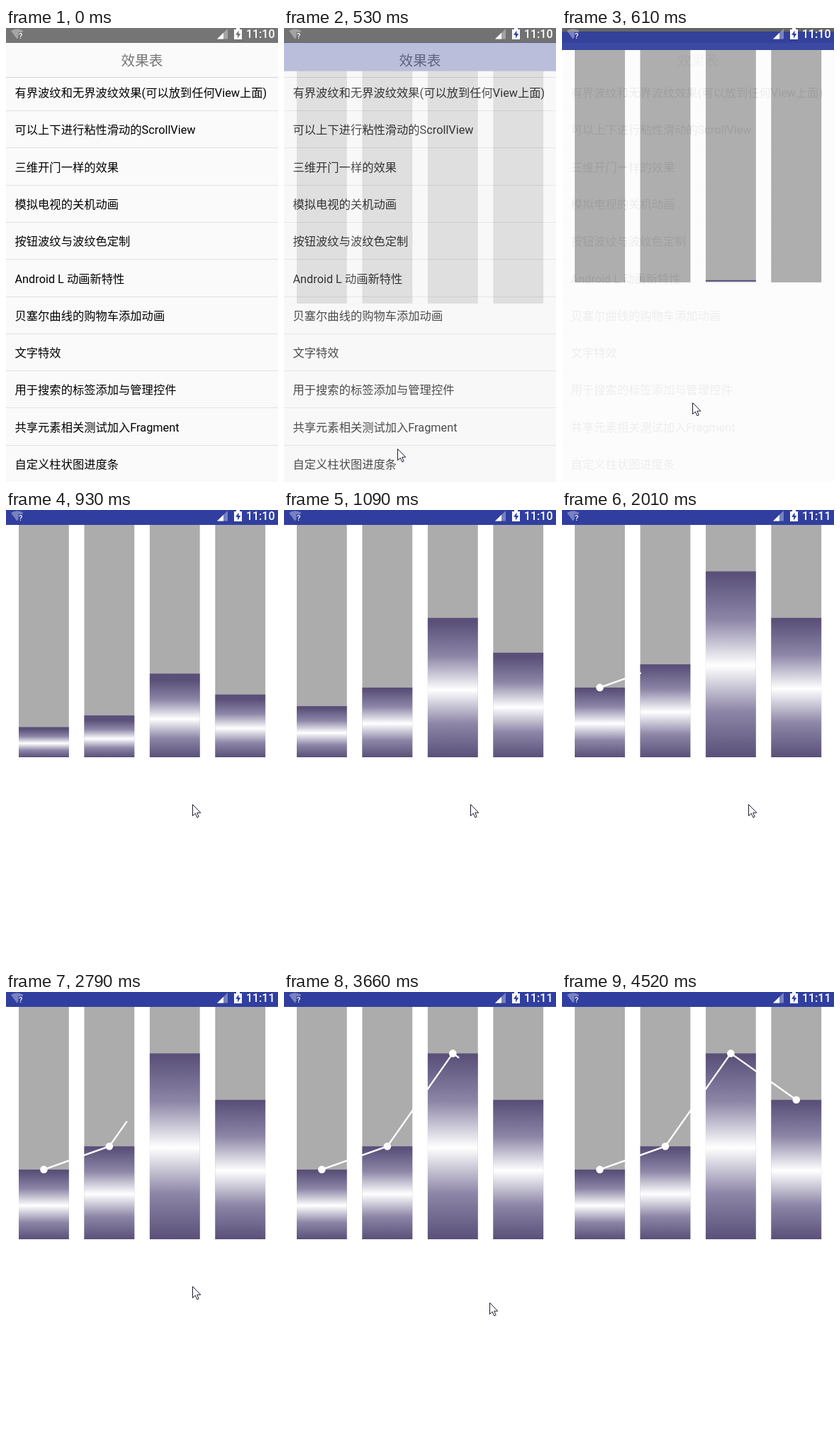
Write an HTML page with a canvas that moves like this. It is 384 px wide and 639 px high and loops after 5.38 s.

```html
<!DOCTYPE html>
<html lang="zh">
<head>
<meta charset="utf-8">
<style>
  html, body { margin: 0; width: 100%; height: 100%; overflow: hidden; background: #fff; }
  canvas { display: block; }
</style>
</head>
<body>
<canvas id="stage" width="384" height="639"></canvas>
<script>
const W = 384, H = 639, LOOP = 5380;
const ctx = document.getElementById('stage').getContext('2d');
const FONT = 'Roboto, "Noto Sans CJK SC", "Noto Sans CJK", sans-serif';

const ROWS = [
  '有界波纹和无界波纹效果(可以放到任何View上面)',
  '可以上下进行粘性滑动的ScrollView',
  '三维开门一样的效果',
  '模拟电视的关机动画',
  '按钮波纹与波纹色定制',
  'Android L 动画新特性',
  '贝塞尔曲线的购物车添加动画',
  '文字特效',
  '用于搜索的标签添加与管理控件',
  '共享元素相关测试加入Fragment',
  '自定义柱状图进度条'
];

const STATUS_H = 21, BASE = 348, FULL = BASE - STATUS_H;
const BAR_W = 70.8, PITCH = 92.45, PERCENTS = [30, 40, 80, 60];
const PAGE_START = 513, GROW_START = 548, GROW_TIME = 809;
const LINE_START = 1415, LINE_TIME = 1020, CLOCK_CHANGE = 1710;

// The screen refreshes in steps: [time, refresh count]
const REFRESH = [[140, 0], [530, 5], [1010, 11], [1090, 12], [1400, 16], [1860, 22], [2010, 24],
  [2490, 30], [3020, 37], [3570, 44], [3660, 45], [4140, 51], [4520, 56]];
const ticks = [0];
REFRESH.forEach(([time, n], i) => {
  ticks.push(time);
  const next = REFRESH[i + 1];
  if (!next) return;
  const steps = next[1] - n;
  for (let k = 1; k < steps; k++) {
    ticks.push(Math.round((time + (next[0] - time) * k / steps) / 10) * 10);
  }
});

// Pointer path: [time, x, y]
const POINTER = [[140, 142, 628], [220, 151, 619], [450, 151, 619], [530, 160, 592], [610, 184, 527],
  [690, 231, 464], [770, 248, 431], [850, 263, 414], [2860, 263, 414], [3020, 273, 423],
  [3570, 286, 432], [3660, 290, 437], [3740, 300, 452], [3980, 376, 596], [4060, 400, 640]];

const clamp = v => Math.max(0, Math.min(1, v));
const ease = v => (1 - Math.cos(Math.PI * clamp(v))) / 2;
const growth = t => ease((t - GROW_START) / GROW_TIME);
const topOf = percent => BASE - FULL * percent / 100;
const barX = i => 18 + PITCH * i;

function rect(color, x, y, w, h) {
  ctx.fillStyle = color;
  ctx.fillRect(x, y, w, h);
}

function shape(color, path) {
  ctx.fillStyle = color;
  ctx.fill(new Path2D(path));
}

function text(str, x, y, font, color, align = 'left') {
  ctx.font = `${font} ${FONT}`;
  ctx.fillStyle = color;
  ctx.textAlign = align;
  ctx.fillText(str, x, y);
}

function drawList() {
  rect('#fafafa', 0, 0, W, H);
  rect('#757575', 0, 0, W, STATUS_H);
  text('效果表', W / 2, 52.5, '19.6px', '#757575', 'center');
  rect('#d4d4d4', 0, 69, W, 1);
  ROWS.forEach((row, i) => {
    text(row, 12.5, 97 + 52.3 * i, '16.3px', '#000');
    rect('#e0e0e0', 0, Math.round(116 + 52.3 * i), W, 1);
  });
}

function drawBar(i, t) {
  const x = barX(i), percent = PERCENTS[i];
  const top = topOf(Math.floor(percent * growth(t)));
  // The shading trails the bar by one display refresh
  const shadeTop = topOf(Math.floor(percent * Math.min(0.99, growth(t - 17))));
  const shade = ctx.createLinearGradient(0, Math.min(shadeTop, BASE - 1), 0, BASE);
  ['#5a5079', '#8d86a7', '#ffffff', '#8d86a7', '#5a5079'].forEach((c, k) => shade.addColorStop(k / 4, c));
  rect('#acacac', x, STATUS_H, BAR_W, FULL);
  rect(shade, x, top, BAR_W, BASE - top);
}

function drawLine(t) {
  if (t < GROW_START + GROW_TIME) return;
  const points = PERCENTS.map((p, i) => [barX(i) + BAR_W / 2, topOf(p)]);
  const progress = Math.max(0, Math.min(3, (t - LINE_START) / LINE_TIME));
  const done = Math.floor(progress);
  ctx.strokeStyle = ctx.fillStyle = '#fff';
  ctx.lineWidth = 2.3;
  ctx.beginPath();
  points.slice(0, done + 1).forEach(p => ctx.lineTo(...p));
  if (done < 3) {
    const [a, b] = [points[done], points[done + 1]], e = ease(progress - done);
    ctx.lineTo(a[0] + (b[0] - a[0]) * e, a[1] + (b[1] - a[1]) * e);
  }
  ctx.stroke();
  points.slice(0, done + 1).forEach(([x, y]) => {
    ctx.beginPath();
    ctx.arc(x, y, 5.3, 0, 7);
    ctx.fill();
  });
}

function drawChart(t) {
  const age = t - PAGE_START;
  const offset = 51 * (1 - clamp(age / 350)) ** 5;
  ctx.save();
  ctx.globalAlpha = 1 - (1 - clamp(age / 200)) ** 4;
  if (ctx.globalAlpha < 1) {
    // Composite the page as one layer: clip each region so nothing overlaps twice
    const y = offset + STATUS_H;
    rect('#303f9f', 0, offset / 2, W, y - offset / 2);
    const edges = [0, ...PERCENTS.flatMap((_, i) => [barX(i), barX(i) + BAR_W]), W];
    for (let i = 0; i < edges.length - 1; i += 2) {
      rect('#fff', edges[i], y, edges[i + 1] - edges[i], FULL);
    }
    rect('#fff', 0, y + FULL, W, H);
    ctx.translate(0, offset);
    PERCENTS.forEach((_, i) => drawBar(i, t));
  } else {
    rect('#fff', 0, 0, W, H);
    rect('#303f9f', 0, 0, W, STATUS_H + offset);
    ctx.translate(0, offset);
    PERCENTS.forEach((_, i) => drawBar(i, t));
    drawLine(t);
  }
  ctx.restore();
}

function drawStatusIcons(t) {
  const faint = 'rgba(255,255,255,.35)';
  shape(faint, 'M7 4Q15.5 -1.5 24.5 4L23 6H17.5V13L15.5 15.5Z');
  text('?', 18, 15, '500 11px', '#fff');
  shape(faint, 'M298 15.5L313 1V15.5Z');
  shape('#fff', 'M298 15.5L307 6.8V15.5Z');
  shape('#fff', 'M322 2H325V0H330V2H333V16H322Z');
  shape(t < PAGE_START ? '#757575' : '#303f9f', 'M328.5 3.5L324 9.8H327V14.5L331.3 8H328.5Z');
  text(t < CLOCK_CHANGE ? '11:10' : '11:11', 379.5, 14.3, '500 16px', '#fff', 'right');
}

function drawPointer(t) {
  const i = POINTER.findIndex(p => p[0] > t);
  if (i < 1) return;
  const [a, b] = [POINTER[i - 1], POINTER[i]];
  const k = (t - a[0]) / (b[0] - a[0]);
  ctx.save();
  ctx.translate(Math.round(a[1] + (b[1] - a[1]) * k) + 0.5, Math.round(a[2] + (b[2] - a[2]) * k) + 0.5);
  const arrow = new Path2D('M0 0V16L3.7 12.5L6.3 18.3L8.7 17.2L6.2 11.6H11.3Z');
  ctx.fillStyle = '#fff';
  ctx.fill(arrow);
  ctx.strokeStyle = '#1c1c2c';
  ctx.lineWidth = 1;
  ctx.stroke(arrow);
  ctx.restore();
}

function draw(t) {
  if (t < PAGE_START + 200) {
    drawList();
    rect(`rgba(0,0,0,${0.3 * clamp((t - PAGE_START) / 217)})`, 0, 0, W, H);
  }
  if (t >= PAGE_START) drawChart(t);
  drawStatusIcons(t);
  drawPointer(t);
}

const start = performance.now();
function frame() {
  const now = (performance.now() - start) % LOOP;
  draw(ticks.filter(tick => tick <= now).pop());
  requestAnimationFrame(frame);
}
frame();
</script>
</body>
</html>
```
